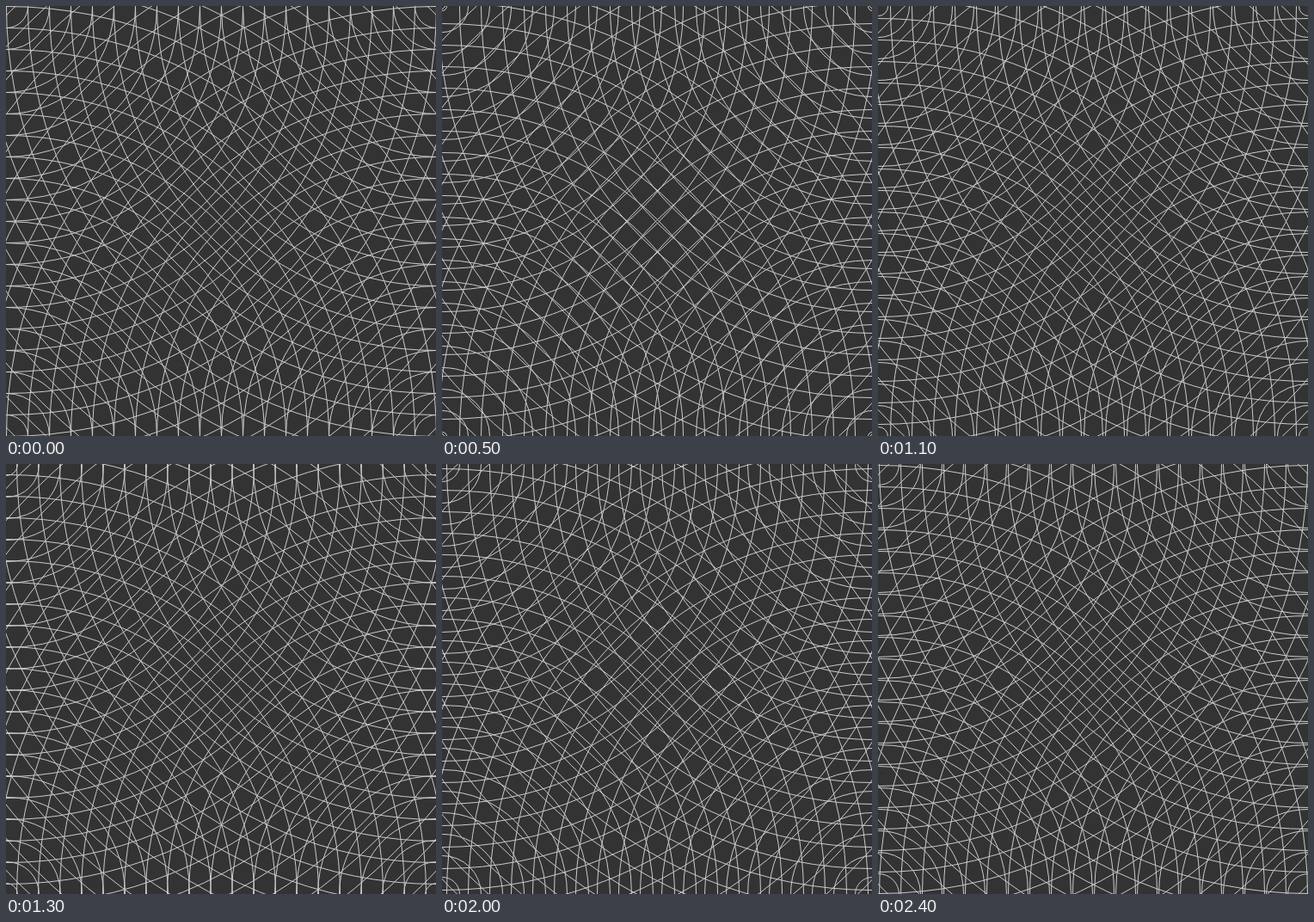
Write an HTML page with a canvas that moves like this. It is 500 px wide and 500 px high and loops after 2.5 s.

```html
<!DOCTYPE html>
<html>
<head>
<meta charset="utf-8">
<style>
html, body { margin: 0; width: 100%; height: 100%; overflow: hidden; background: #333; }
canvas { display: block; }
</style>
</head>
<body>
<canvas id="stage" width="500" height="500"></canvas>
<script>
const SIZE = 500, GAP = 25, STEP = 100;
const REACH = SIZE * Math.SQRT2;
const ctx = document.getElementById('stage').getContext('2d');
ctx.strokeStyle = '#ccc';
ctx.lineWidth = 1;
ctx.translate(0.5, 0.5); // centre strokes on pixels

// Rings spread from all four corners, one pixel per step.
function draw(now) {
  const phase = Math.floor(now / STEP) % GAP;
  ctx.fillStyle = '#333';
  ctx.fillRect(-1, -1, SIZE + 2, SIZE + 2);
  for (const x of [0, SIZE]) {
    for (const y of [0, SIZE]) {
      for (let r = phase; r < REACH; r += GAP) {
        ctx.beginPath();
        ctx.arc(x, y, r, 0, 2 * Math.PI);
        ctx.stroke();
      }
    }
  }
}

const start = performance.now();
function tick() {
  draw(performance.now() - start);
  requestAnimationFrame(tick);
}
tick();
</script>
</body>
</html>
```
